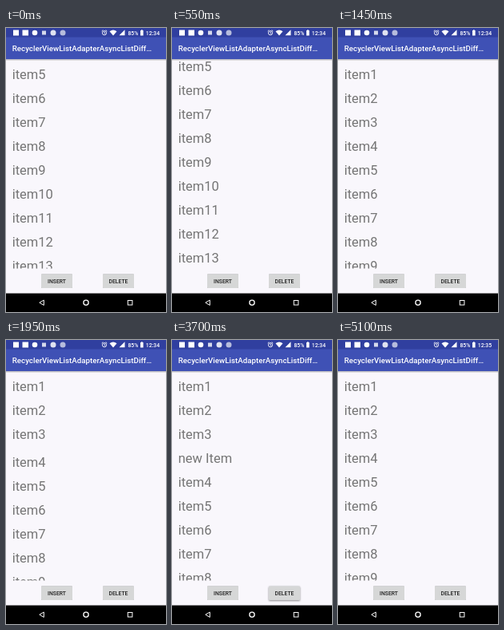
These frames come from a looping animation (200 by 356 pixels, 5.15 s). An HTML page:

```html
<!DOCTYPE html>
<html lang="en">
<head>
<meta charset="utf-8">
<title>List insert and delete</title>
<style>
  html, body { margin: 0; width: 100%; height: 100%; overflow: hidden; background: #f9f7fc; }
  svg { display: block; width: 100%; height: 100%; font-family: Roboto, sans-serif; }
  .row { font-size: 16.5px; fill: #757575; }
  .title { font-size: 9.73px; font-weight: 500; fill: #fff; }
  .status { font-size: 6.8px; font-weight: 500; fill: #fff; }
  .button rect { fill: #d6d7d7; }
  .button text { font-size: 6.8px; font-weight: 500; fill: #212121; text-anchor: middle; }
  .line { fill: none; stroke: #fff; }
</style>
</head>
<body>
<svg viewBox="0 0 200 356">
  <defs>
    <clipPath id="viewport"><rect y="39" width="200" height="262.5"/></clipPath>
    <linearGradient id="shade" x2="0" y2="1">
      <stop stop-color="#000" stop-opacity=".28"/>
      <stop offset="1" stop-color="#000" stop-opacity="0"/>
    </linearGradient>
  </defs>
  <rect width="200" height="356" fill="#f9f7fc"/>
  <g clip-path="url(#viewport)"><g id="list"></g></g>

  <rect y="39" width="200" height="2.5" fill="url(#shade)"/>
  <rect y="11" width="200" height="28" fill="#3f51b5"/>
  <rect width="200" height="11.5" fill="#303f9f"/>
  <text class="title" x="7.8" y="28.9">RecyclerViewListAdapterAsyncListDiff…</text>

  <!-- status icons -->
  <g fill="#fff">
    <rect x="9" y="2.5" width="7" height="7"/>
    <rect x="20.5" y="2.5" width="7.5" height="7"/>
    <circle cx="36" cy="6" r="3.3"/>
    <rect x="45" y="3.5" width="5" height="5" opacity=".8"/>
    <circle cx="59" cy="6" r="3.5" opacity=".85"/>
    <circle cx="71" cy="6" r="3.5" opacity=".65"/>
    <path d="M129.5 4.2Q134 .9 138.5 4.2L134 9.5Z"/>
    <path d="M148.5 2.3V9.3H141.5Z"/>
    <path d="M168 3h1V2.3h1.6V3h1V9.4H168Z"/>
  </g>
  <g class="line" stroke-width=".9">
    <circle cx="123" cy="6.2" r="2.6"/>
    <path d="M123 4.5V6.4L124.3 7.2M119.7 4L121.3 2.6M126.3 4L124.7 2.6"/>
  </g>
  <text class="status" x="152.5" y="8.5">85%</text>
  <text class="status" x="174.8" y="8.5" id="clock"></text>

  <g class="button" id="insert">
    <rect x="44" y="308.5" width="39" height="17.5" rx="1"/><text x="63.5" y="319.7">INSERT</text>
  </g>
  <g class="button" id="delete">
    <rect x="121" y="308.5" width="39" height="17.5" rx="1"/><text x="140.5" y="319.7">DELETE</text>
  </g>

  <rect y="332.6" width="200" height="23.4"/>
  <g class="line" stroke-width="1">
    <path d="M41.8 344.3L47.3 341.1V347.5Z" stroke-linejoin="round"/>
    <circle cx="100" cy="344.3" r="3.1" stroke-width="1.3"/>
    <rect x="152.3" y="341.5" width="5.6" height="5.6"/>
  </g>
</svg>
<script>
const LOOP = 5150, STEP = 50, ROW = 30, FIRST_BASELINE = 64, NEW_SLOT = 3, PEAK = 175.5;
const byId = id => document.getElementById(id);
const list = byId('list');

const progress = (t, start, length) => Math.min(1, Math.max(0, (t - start) / length));
const sway = u => (1 - Math.cos(Math.PI * u)) / 2;
const smooth = u => u * u * (3 - 2 * u);

function addRow(label) {
  const row = document.createElementNS('http://www.w3.org/2000/svg', 'text');
  row.setAttribute('class', 'row');
  row.setAttribute('x', 7.7);
  row.textContent = label;
  return list.appendChild(row);
}
const place = (row, slot) => row.setAttribute('y', FIRST_BASELINE + slot * ROW);

const items = Array.from({ length: 18 }, (_, i) => addRow('item' + (i + 1)));
const newItem = addRow('new Item');
place(newItem, NEW_SLOT);

function scrollAt(t) {
  if (t < 300) return 120 + (PEAK - 120) * (1 - (1 - t / 300) ** 2);
  return PEAK * (1 - smooth(progress(t, 300, 750)));
}

// A pressed button is raised, then sinks back.
function raise(id, t, start) {
  const press = t < start ? 0 : 1 - progress(t, start + 100, 200);
  byId(id).firstElementChild.style.filter =
    `drop-shadow(0 ${0.7 + 0.8 * press}px ${0.6 + 0.7 * press}px rgba(0,0,0,${0.35 + 0.1 * press}))`;
}

function draw(t) {
  list.setAttribute('transform', `translate(0 ${-scrollAt(t)})`);
  const shift = sway(progress(t, 1880, 250)) - sway(progress(t, 3870, 230));
  items.forEach((row, i) => place(row, i < NEW_SLOT ? i : i + shift));
  newItem.setAttribute('opacity', progress(t, 2130, 120) - progress(t, 3750, 120));
  raise('insert', t, 1700);
  raise('delete', t, 3700);
  byId('clock').textContent = t < 5100 ? '12:34' : '12:35';
}

const began = performance.now();
function tick() {
  const t = (performance.now() - began) % LOOP;
  draw(Math.floor(t / STEP) * STEP);
  requestAnimationFrame(tick);
}
tick();
</script>
</body>
</html>
```
